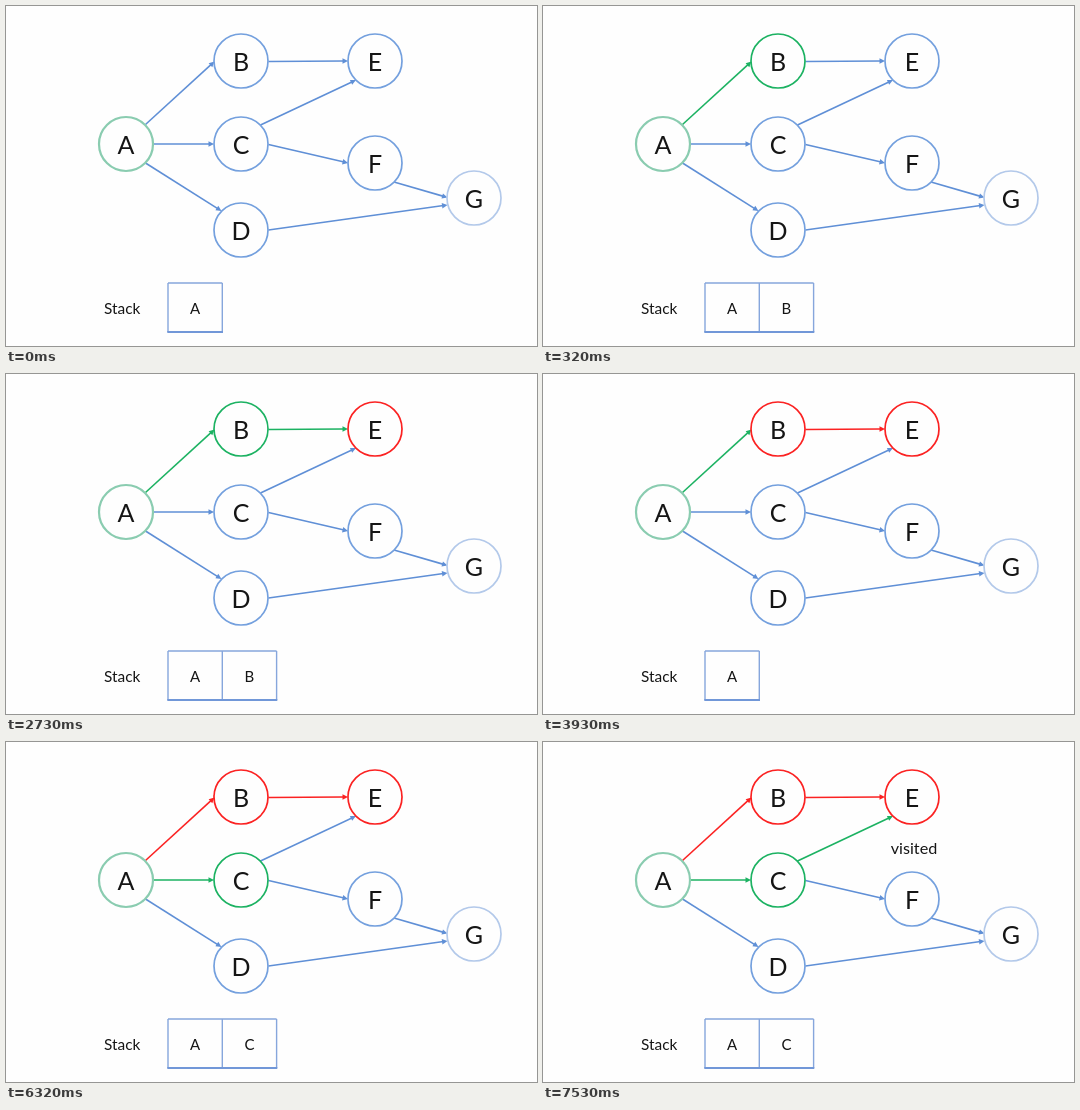
An HTML page for the animation above (8000 ms loop, 531 px wide and 340 px high).

```html
<!DOCTYPE html>
<html lang="en">
<head>
<meta charset="utf-8">
<title>Depth-first search with a stack</title>
<style>
  html, body { margin: 0; width: 100%; height: 100%; overflow: hidden; background: #fefefe; }
  svg { display: block; width: 100%; height: 100%; }
  text { font-family: Lato, "Open Sans", sans-serif; fill: #151515; }
  .name { font-size: 25px; text-anchor: middle; }
  .cell { font-size: 15px; text-anchor: middle; }
</style>
</head>
<body>
<svg id="stage" viewBox="0 0 531 340"></svg>
<script>
const LOOP = 8000;
const BLUE = '#5f8fd6', GREEN = '#1cb262', RED = '#fb2222';
const RING = '#74a0de', PALE = '#b3c9ea', MINT = '#8accb0';
const CELL_X = 162, CELL_Y = 277, CELL_W = 54.3, CELL_H = 49;

const nodes = {
  A: [120, 138], B: [235, 55], C: [235, 138], D: [235, 224],
  E: [369, 55], F: [369, 157], G: [468, 192]
};
const edges = {
  AB: [139.5, 118.5, 208.5, 55.5],
  AC: [147.5, 138, 208, 138],
  AD: [139.5, 157, 215.5, 205],
  BE: [262.5, 55.5, 342, 55],
  CE: [254.5, 119, 350, 74],
  CF: [262.5, 138.5, 342, 157],
  DG: [262.5, 224, 441.5, 199],
  FG: [388, 176, 441.5, 191.5]
};

// Each step takes effect at its time and stays until the loop ends.
const steps = [
  { at: 0, stack: 'A' },
  { at: 320, stack: 'AB', paint: { AB: GREEN, B: GREEN } },
  { at: 1520, stack: 'ABE', paint: { BE: GREEN, E: GREEN } },
  { at: 2730, stack: 'AB', paint: { E: RED } },
  { at: 3930, stack: 'A', paint: { BE: RED, B: RED } },
  { at: 5120, paint: { AB: RED } },
  { at: 6320, stack: 'AC', paint: { AC: GREEN, C: GREEN } },
  { at: 7530, paint: { CE: GREEN }, visited: true }
];

const stage = document.getElementById('stage');

function add(tag, attrs, parent = stage) {
  const el = document.createElementNS('http://www.w3.org/2000/svg', tag);
  for (const key in attrs) el.setAttribute(key, attrs[key]);
  return parent.appendChild(el);
}

function label(str, x, y, attrs) {
  const el = add('text', { x, y, ...attrs });
  el.textContent = str;
  return el;
}

function makeEdge([x1, y1, x2, y2]) {
  const angle = Math.atan2(y2 - y1, x2 - x1);
  const g = add('g', {});
  add('line', {
    x1, y1, x2: x2 - 4 * Math.cos(angle), y2: y2 - 4 * Math.sin(angle), 'stroke-width': 1.6
  }, g);
  add('path', {
    d: 'M0 0L-5.5 -2.7V2.7Z', stroke: 'none',
    transform: `translate(${x2} ${y2}) rotate(${angle * 180 / Math.PI})`
  }, g);
  return g;
}

const edgeEls = {}, ringEls = {};
for (const id in edges) edgeEls[id] = makeEdge(edges[id]);
for (const id in nodes) {
  const [cx, cy] = nodes[id];
  ringEls[id] = add('circle', { cx, cy, r: 27, fill: '#fefefe' });
  label(id, cx, cy + 10, { class: 'name' });
}

const cellPath = add('path', { fill: 'none', stroke: '#86a6dc', 'stroke-width': 1.4 });
const basePath = add('path', { fill: 'none', stroke: '#7197d8', 'stroke-width': 1.8 });
const cellText = [0, 1, 2].map(i =>
  label('', CELL_X + CELL_W * (i + 0.5), CELL_Y + 30.5, { class: 'cell' }));
label('Stack', 98, 308, { 'font-size': 15.4 });
const visitedText = label('visited', 371, 112, { 'font-size': 16.2, 'text-anchor': 'middle' });

function stateAt(time) {
  const state = { stack: '', paint: {}, visited: false };
  for (const step of steps) {
    if (step.at > time) break;
    Object.assign(state.paint, step.paint);
    if (step.stack) state.stack = step.stack;
    if (step.visited) state.visited = true;
  }
  return state;
}

function render(time) {
  const { stack, paint, visited } = stateAt(time);
  for (const id in edgeEls) {
    const color = paint[id] || BLUE;
    edgeEls[id].setAttribute('stroke', color);
    edgeEls[id].setAttribute('fill', color);
  }
  const rest = { A: MINT, G: PALE };
  for (const id in ringEls) {
    ringEls[id].setAttribute('stroke', paint[id] || rest[id] || RING);
    ringEls[id].setAttribute('stroke-width', id === 'A' ? 2.2 : 1.7);
  }

  const right = CELL_X + CELL_W * stack.length, bottom = CELL_Y + CELL_H;
  let d = `M${CELL_X} ${CELL_Y}H${right}`;
  for (let i = 0; i <= stack.length; i++) d += `M${CELL_X + CELL_W * i} ${CELL_Y}V${bottom}`;
  cellPath.setAttribute('d', d);
  basePath.setAttribute('d', `M${CELL_X - 0.7} ${bottom}H${right + 0.7}`);
  cellText.forEach((el, i) => { el.textContent = stack[i] || ''; });
  visitedText.setAttribute('visibility', visited ? 'visible' : 'hidden');
}

const start = performance.now();
function tick() {
  render((performance.now() - start) % LOOP);
  requestAnimationFrame(tick);
}
tick();
</script>
</body>
</html>
```
